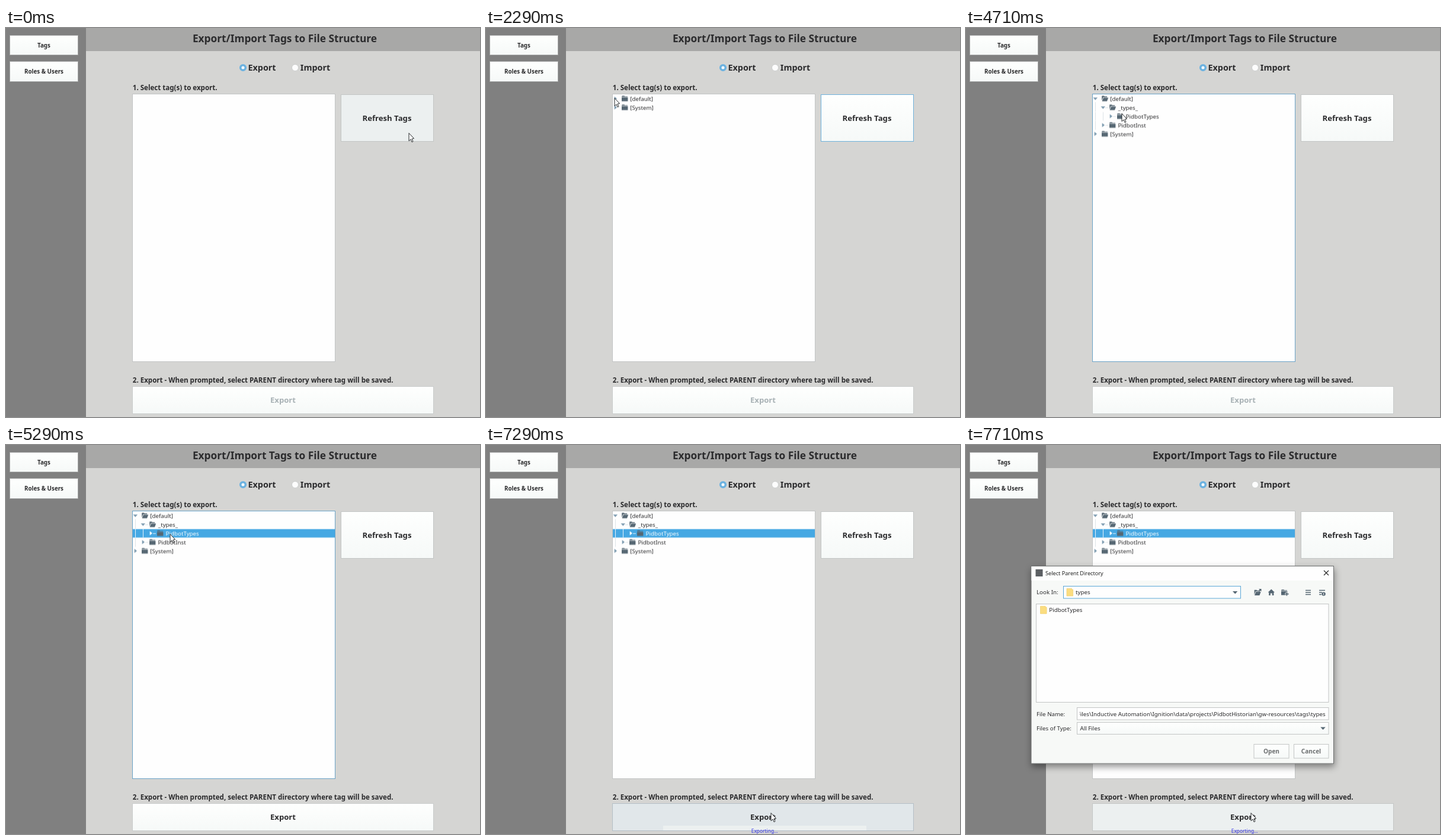
Recreate the animation shown at these times as an HTML page. Size 800 by 657 pixels, loop 8 s.

```html
<!DOCTYPE html>
<html lang="en">
<head>
<meta charset="utf-8">
<title>Export/Import Tags</title>
<style>
html, body { margin: 0; width: 100%; height: 100%; overflow: hidden; background: #d5d5d3; }
svg { display: block; }
text { font-family: "Noto Sans", "Open Sans", sans-serif; fill: #2b2b2d; font-size: 9.75px; white-space: pre; }
.b { font-weight: 700; }
.mid { text-anchor: middle; }
.side { font-size: 9.8px; }
.label { font-size: 11.57px; }
.radio { font-size: 14.35px; }
.big { font-size: 13.15px; }
.box { fill: #fefefe; stroke: #c2c4c4; }
.btn { fill: url(#face); stroke: #c3c6c5; }
.dim { stroke: #a6a7a7; }
.guide { stroke: #dde3e7; fill: none; }
.tri { fill: #7d9bb0; }
.ico { fill: #566773; }

/* every state change is a hard cut on one shared clock */
.a { animation: 8s step-end infinite; }
.cursor { animation-name: cursor; }
.refresh { animation-name: refresh; }
.focus { animation-name: focus; }
.tree { animation-name: tree; }
.shut0 { animation-name: shut0; }
.open0 { animation-name: open0; }
.kids { animation-name: kids; }
.system { animation-name: system; }
.shut1 { animation-name: shut1; }
.open1 { animation-name: open1; }
.inst { animation-name: inst; }
.sel { animation-name: sel; }
.selText { animation-name: selText; }
.selTri { animation-name: selTri; }
.selGuide { animation-name: selGuide; }
.exportFace { animation-name: exportFace; }
.exportText { animation-name: exportText; }
.status { animation-name: status; }
.dialog { animation-name: dialog; }

@keyframes cursor {
  0% { transform: translate(680px, 177px); }
  16.125% { transform: translate(672px, 182px); }
  17.875% { transform: translate(628px, 194px); }
  19.625% { transform: translate(530px, 196px); }
  21.375% { transform: translate(395px, 183px); }
  23.25% { transform: translate(276px, 156px); }
  25% { transform: translate(210px, 130px); }
  26.75% { transform: translate(197px, 121px); }
  28.625% { transform: translate(217px, 118px); }
  37.5% { transform: translate(220px, 122px); }
  39.25% { transform: translate(233px, 127px); }
  41.125% { transform: translate(238px, 131px); }
  42.875% { transform: translate(231px, 135px); }
  44.625% { transform: translate(225px, 136px); }
  46.375% { transform: translate(228px, 134px); }
  48.25% { transform: translate(230px, 133px); }
  55.375% { transform: translate(236px, 136px); }
  57.125% { transform: translate(250px, 140px); }
  58.875% { transform: translate(263px, 144px); }
  60.75% { transform: translate(273px, 148px); }
  62.5% { transform: translate(277px, 150px); }
  73.25% { transform: translate(286px, 160px); }
  75% { transform: translate(340px, 240px); }
  76.75% { transform: translate(440px, 375px); }
  78.625% { transform: translate(517px, 468px); }
  80.375% { transform: translate(520px, 548px); }
  82.125% { transform: translate(505px, 597px); }
  83.875% { transform: translate(488px, 618px); }
  85.75%, 100% { transform: translate(481px, 621px); }
}
@keyframes refresh {
  0% { fill: #ecf0f0; stroke: #c3c6c5; }
  8.875% { fill: #e1e7ea; stroke: #b4bfc6; }
  10.75% { fill: #ecf0f0; stroke: #6fb2dc; }
  17.875% { fill: transparent; stroke: #6fb2dc; }
  32.125%, 100% { fill: transparent; stroke: #c3c6c5; }
}
@keyframes focus {
  0% { stroke: #c2c4c4; }
  32.125% { stroke: #6ba3c8; }
  87.5%, 100% { stroke: #c2c4c4; }
}
@keyframes tree { 0% { opacity: 0; } 12.5%, 100% { opacity: 1; } }
@keyframes shut0 { 0% { opacity: 1; } 32.125%, 100% { opacity: 0; } }
@keyframes open0 { 0% { opacity: 0; } 32.125%, 100% { opacity: 1; } }
@keyframes kids { 0% { opacity: 0; } 33.875%, 100% { opacity: 1; } }
@keyframes system {
  0% { transform: translateY(14.9px); }
  33.875% { transform: translateY(44.7px); }
  51.75%, 100% { transform: translateY(59.6px); }
}
@keyframes shut1 { 0% { opacity: 1; } 51.75%, 100% { opacity: 0; } }
@keyframes open1 { 0% { opacity: 0; } 51.75%, 100% { opacity: 1; } }
@keyframes inst { 0% { transform: translateY(29.8px); } 51.75%, 100% { transform: translateY(44.7px); } }
@keyframes sel { 0% { opacity: 0; } 66.125%, 100% { opacity: 1; } }
@keyframes selText { 0% { fill: #2b2b2d; } 66.125%, 100% { fill: #fff; } }
@keyframes selTri { 0% { fill: #7d9bb0; } 66.125%, 100% { fill: #fff; } }
@keyframes selGuide { 0% { stroke: #dde3e7; } 66.125%, 100% { stroke: #e6f3fb; } }
@keyframes exportFace {
  0% { fill: transparent; stroke: #c9cccb; }
  83.875% { fill: #ecf0f0; stroke: #c3c6c5; }
  87.5% { fill: #e1e7ea; stroke: #b4bfc6; }
  92.875%, 100% { fill: #ecf0f0; stroke: #c3c6c5; }
}
@keyframes exportText { 0% { fill: #a9b2b6; } 66.125%, 100% { fill: #2b2b2d; } }
@keyframes status { 0% { opacity: 0; } 89.25%, 100% { opacity: 1; } }
@keyframes dialog { 0% { opacity: 0; } 94.625%, 100% { opacity: 1; } }
</style>
</head>
<body>
<svg width="800" height="657" viewBox="0 0 800 657">
  <defs>
    <linearGradient id="face" x2="0" y2="1">
      <stop offset="0" stop-color="#fefffe"/><stop offset="1" stop-color="#f6f9f8"/>
    </linearGradient>
    <filter id="shade" x="-10%" y="-10%" width="120%" height="125%">
      <feDropShadow dx="1" dy="5" stdDeviation="6" flood-opacity=".42"/>
    </filter>
    <clipPath id="field"><rect x="191.5" y="444" width="418" height="19"/></clipPath>
    <!-- tree parts are centred on the row's y = 0 -->
    <path id="shut" class="ico" d="M1 -4.8H4.4L5.4 -3.7H10V-2.7H0V-3.8ZM0 -2H10.4V4.6H0Z"/>
    <path id="open" class="ico" d="M1 -4.8H4.4L5.4 -3.7H9.6V-2.2H2.8L0.6 3.4V-4.4ZM3.4 -1.4H11.6L9.4 4.6H1Z"/>
    <path id="right" d="M-1.8 -3.4L2.6 0L-1.8 3.4Z"/>
    <path id="down" d="M-3.8 -1.8H3.8L0 2.4Z"/>
    <path id="yellow" d="M0 0H8.6V1.6H10.6V12.6H0Z" fill="#fbdd80" stroke="#ebc862" stroke-width=".6"/>
  </defs>

  <rect width="800" height="657" fill="#d5d5d3"/>
  <rect width="135" height="657" fill="#808080"/>
  <rect x="135" width="665" height="39" fill="#a8a8a7"/>

  <rect class="btn dim" x="6.5" y="12.5" width="115" height="33"/>
  <text class="b mid side" x="64" y="33">Tags</text>
  <rect class="btn dim" x="6.5" y="56.5" width="115" height="34"/>
  <text class="b mid side" x="64" y="77">Roles &amp; Users</text>

  <text class="b mid" x="470.5" y="24" style="font-size:17.3px">Export/Import Tags to File Structure</text>

  <circle cx="400" cy="67" r="4.3" fill="#fff" stroke="#6cb2e0" stroke-width="3.6"/>
  <text class="b radio" x="408.5" y="72.2">Export</text>
  <circle cx="488" cy="67" r="5.5" fill="#fdfdfd" stroke="#c6c8c8" stroke-width=".8"/>
  <text class="b radio" x="496.8" y="72.2">Import</text>

  <text class="b label" x="213.8" y="105.4">1. Select tag(s) to export.</text>
  <rect class="box a focus" x="213.5" y="111.5" width="342" height="452"/>

  <rect class="btn" x="565.5" y="112.5" width="156" height="79"/>
  <rect class="a refresh" x="565.5" y="112.5" width="156" height="79"/>
  <text class="b mid big" x="643" y="156.5">Refresh Tags</text>

  <g class="a tree" transform="translate(0 119.2)">
    <g class="a shut0"><use href="#right" class="tri" x="218.5"/><use href="#shut" x="229"/></g>
    <g class="a open0"><use href="#down" class="tri" x="218.3"/><use href="#open" x="228.6"/></g>
    <text x="243.2" y="3.6">[default]</text>

    <g class="a kids">
      <g transform="translate(0 14.9)">
        <path class="guide" d="M218.5 -9V7M235 .5H240"/>
        <g class="a shut1"><use href="#right" class="tri" x="231.5"/><use href="#shut" x="242"/></g>
        <g class="a open1"><use href="#down" class="tri" x="231.3"/><use href="#open" x="241.6"/></g>
        <text x="256.8" y="3.6">_types_</text>
      </g>
      <g class="a open1">
        <g transform="translate(0 29.8)">
          <rect class="a sel" x="214" y="-7" width="341" height="14.3" fill="#45a8e3"/>
          <path class="guide a selGuide" d="M218.5 -7V7.3M231.5 -7V7.3M248 .5H253"/>
          <use href="#right" class="tri a selTri" x="244.5"/>
          <use href="#shut" x="255"/>
          <text class="a selText" x="269.6" y="3.6">PidbotTypes</text>
        </g>
      </g>
      <g class="a inst">
        <path class="guide" d="M218.5 -7V8M235 .5H240"/>
        <use href="#right" class="tri" x="231.5"/>
        <use href="#shut" x="242"/>
        <text x="256.4" y="3.6">PidbotInst</text>
      </g>
    </g>

    <g class="a system">
      <use href="#right" class="tri" x="218.5"/>
      <use href="#shut" x="229"/>
      <text x="243.2" y="3.6">[System]</text>
    </g>
  </g>

  <text class="b label" x="213.8" y="599">2. Export - When prompted, select PARENT directory where tag will be saved.</text>
  <rect class="btn" x="213.5" y="605.5" width="508" height="46"/>
  <rect class="a exportFace" x="213.5" y="605.5" width="508" height="46"/>
  <text class="b mid big a exportText" x="467.5" y="633.2">Export</text>

  <g class="a status">
    <rect x="299" y="643" width="343" height="8" fill="#ecf0f0"/>
    <text class="mid" x="470.3" y="654.5" style="font-size:8.4px;fill:#3232e6">Exporting...</text>
  </g>

  <g class="a dialog">
    <rect x="110" y="204.5" width="510.5" height="333.5" fill="#f7f9f7" stroke="#6c6e6e" filter="url(#shade)"/>
    <rect x="110.5" y="205" width="509.5" height="24" fill="#fefefe"/>
    <rect x="117.5" y="210" width="12" height="12" fill="#5c5f63"/>
    <text x="134" y="219.8" style="font-family:'Open Sans',sans-serif;font-size:9.2px;fill:#111">Select Parent Directory</text>
    <path d="M604 212L612 220M612 212L604 220" stroke="#222" stroke-width="1.1"/>

    <text x="119" y="252.2">Look In:</text>
    <rect class="box" x="164.5" y="238.5" width="299" height="20.5" style="stroke:#5ba7d6"/>
    <use href="#yellow" x="170" y="242.5"/>
    <text x="185" y="252.2">types</text>
    <path class="ico" d="M450 247H458.4L454.2 251.6Z"/>

    <!-- toolbar -->
    <use href="#open" x="486" y="249.5"/>
    <path class="ico" d="M494 243H498.5V247.5L497 246L495 248L493.6 246.6L495.6 244.6Z"/>
    <path class="ico" d="M515.3 243.6L521 249H519.4V254H516.8V250.6H513.8V254H511.2V249H509.6Z"/>
    <use href="#shut" x="532" y="249"/>
    <path d="M541.4 248V255M538 251.5H545" stroke="#f7f9f7" stroke-width="3"/>
    <path d="M541.4 248.4V254.8M538.2 251.6H544.6" stroke="#566773" stroke-width="1.6"/>
    <path d="M573 245.5H582M573 249H582M573 252.5H582" stroke="#566773" stroke-width="1.5"/>
    <path d="M596 245.5H606M596 249H601M596 252.5H600" stroke="#566773" stroke-width="1.4"/>
    <circle class="ico" cx="603.6" cy="251.6" r="3.2"/>
    <path d="M603.6 250V253.4" stroke="#fff"/>

    <rect class="box" x="118.5" y="268.5" width="493.5" height="166"/>
    <use href="#yellow" x="125.5" y="272.3"/>
    <text x="140.3" y="282.2">PidbotTypes</text>

    <text x="119" y="457.6">File Name:</text>
    <rect class="box" x="187.5" y="443.5" width="424.5" height="20.5"/>
    <g clip-path="url(#field)">
      <text x="606.6" y="457.6" text-anchor="end">Files\Inductive Automation\Ignition\data\projects\PidbotHistorian\gw-resources\tags\types</text>
    </g>
    <text x="119" y="482.2">Files of Type:</text>
    <rect class="btn" x="187.5" y="468.5" width="424.5" height="20"/>
    <text x="192.5" y="482.2">All Files</text>
    <path class="ico" d="M598.3 476.4H606.7L602.5 481Z"/>

    <rect class="btn" x="486" y="505.5" width="59" height="23.5"/>
    <text class="b mid" x="515.5" y="521" style="font-size:10.1px;fill:#6c6f70">Open</text>
    <rect class="btn" x="553.5" y="505.5" width="58.5" height="23.5"/>
    <text class="b mid" x="582.5" y="521" style="font-size:10.1px;fill:#6c6f70">Cancel</text>
  </g>

  <path class="a cursor" d="M0 .5V13.8L3 11L5 15.6L7 14.7L5 10.2L8.6 9.6Z" fill="#fff" stroke="#25282a" stroke-linejoin="round"/>
</svg>
</body>
</html>
```
